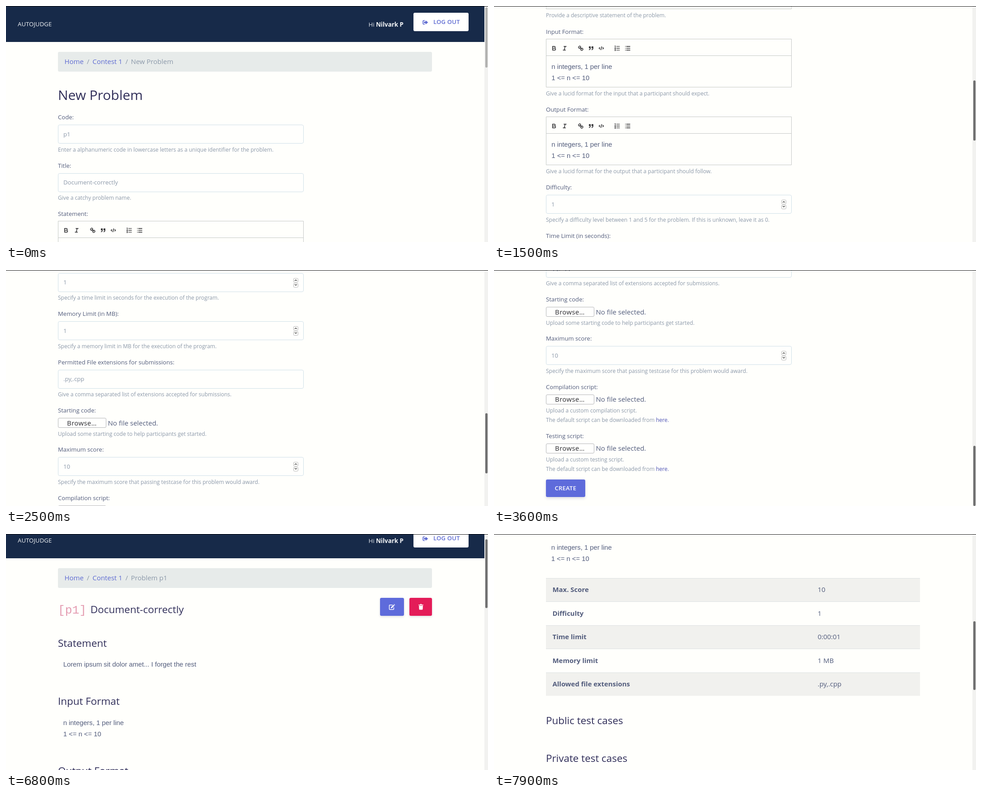
Write an HTML page with a canvas that moves like this. It is 1067 px wide and 525 px high and loops after 8 s.

```html
<!DOCTYPE html>
<html lang="en">
<head>
<meta charset="utf-8">
<title>New Problem</title>
<style>
  html, body { margin: 0; width: 100%; height: 100%; overflow: hidden; background: #fffffc; }
  canvas { display: block; width: 1067px; height: 525px; }
</style>
</head>
<body>
<canvas id="stage" width="1067" height="525"></canvas>
<script>
const W = 1067, H = 525, LOOP = 8000, STEP = 100;
const ctx = document.getElementById('stage').getContext('2d');

const OPEN = '"Open Sans", "Noto Sans", sans-serif';
const ARIAL = '"Liberation Sans", Arial, sans-serif';
const MONO = '"Liberation Mono", monospace';
const REM = 14.93, LABEL = 13.1, SMALL = 12, HEAD = 22.4, PROSE = 14.8;
const C = {
  page: '#fffffc', nav: '#172a49', crumb: '#e7ebea', head: '#302e59', body: '#525c7c',
  muted: '#8b98a9', link: '#5e6bd2', primary: '#5e6bdb', danger: '#e41c58',
  input: '#cfdfe8', line: '#c5c8c7', icon: '#3c3c3e', thumb: '#707070'
};

// Scroll offsets at [ms, px]
const formScroll = [[600, 0], [700, 90], [900, 318], [2000, 751], [2500, 1075], [2600, 1075], [2700, 1165], [2900, 1300], [3000, 1322]];
const viewScroll = [[6700, 0], [6800, 26], [7200, 194], [7900, 571]];

function track(keys, t) {
  if (t <= keys[0][0]) return keys[0][1];
  for (let i = 1; i < keys.length; i++) {
    const [t0, v0] = keys[i - 1], [t1, v1] = keys[i];
    if (t <= t1) return Math.round(v0 + (v1 - v0) * (t - t0) / (t1 - t0));
  }
  return keys[keys.length - 1][1];
}

// Text is placed by the middle of its capitals
function text(str, x, mid, size, color, { font = OPEN, weight = 400, align = 'left', spacing = 0 } = {}) {
  ctx.font = `${weight} ${size}px ${font}`;
  ctx.letterSpacing = spacing + 'px';
  ctx.textAlign = align;
  ctx.fillStyle = color;
  ctx.fillText(str, x, Math.round(mid + size * 0.36));
  ctx.letterSpacing = '0px';
}

function rect(x, y, w, h, color) {
  ctx.fillStyle = color;
  ctx.fillRect(x, y, w, h);
}

function box(x, y, w, h, r, fill, stroke) {
  ctx.beginPath();
  const inset = stroke ? 0.5 : 0;
  ctx.roundRect(x + inset, y + inset, w - 2 * inset, h - 2 * inset, r);
  if (fill) { ctx.fillStyle = fill; ctx.fill(); }
  if (stroke) { ctx.strokeStyle = stroke; ctx.lineWidth = 1; ctx.stroke(); }
}

function button(x, y, w, h, color, lift = 0) {
  ctx.save();
  ctx.shadowColor = `rgba(50,50,93,${0.16 + 0.04 * lift})`;
  ctx.shadowBlur = 5 + 4 * lift;
  ctx.shadowOffsetY = 2 + 2 * lift;
  box(x, y, w, h, 3.3, color);
  ctx.restore();
}

// Icons: stroked and filled outlines in a square of the given size
function icon({ size, line, fill, width = 2 }, cx, cy, scale, color) {
  ctx.save();
  ctx.translate(cx, cy);
  ctx.scale(scale, scale);
  ctx.translate(-size / 2, -size / 2);
  ctx.strokeStyle = ctx.fillStyle = color;
  ctx.lineWidth = width;
  ctx.lineCap = ctx.lineJoin = 'round';
  if (line) ctx.stroke(new Path2D(line));
  if (fill) ctx.fill(new Path2D(fill));
  ctx.restore();
}

const tools = [
  [133, { size: 18, line: 'M5 4H9.5A2.5 2.5 0 0 1 9.5 9H5ZM5 9H10.5A2.5 2.5 0 0 1 10.5 14H5Z' }],
  [156.5, { size: 18, line: 'M7 4H13M5 14H11M8 14L10 4' }],
  [192, { size: 18, line: 'M7 7L11 11M8.9 4.6A3.4 3.4 0 0 1 4.6 8.9C3.2 7.5 2 6.4 4.2 4.2S7.5 3.2 8.9 4.6ZM13.4 9.1A3.4 3.4 0 0 0 9.1 13.4C10.5 14.8 11.6 16 13.8 13.8S14.8 10.5 13.4 9.1Z' }],
  [215, { size: 18, line: 'M4 5H7V8H4ZM11 5H14V8H11ZM7 8C7 12 4 13 4 13M14 8C14 12 11 13 11 13', fill: 'M4 5H7V8H4ZM11 5H14V8H11Z' }],
  [237.5, { size: 18, line: 'M5 7L3 9 5 11M13 7L15 9 13 11M10 5L8 13' }],
  [273, { size: 18, width: 1.6, line: 'M7 4H15M7 9H15M7 14H15M2.5 3L3.5 2.5V5.5M2.5 7.8H4L2.5 10.2H4.2M2.5 12.5H4L3.2 14 4 15.5H2.5' }],
  [296, { size: 18, line: 'M6 4H15M6 9H15M6 14H15M3 4H3.05M3 9H3.05M3 14H3.05' }]
];
const signOut = { size: 16, line: 'M6 3H4Q2 3 2 5V11Q2 13 4 13H6', fill: 'M4.5 6H9V2.4L15.8 8 9 13.6V10H4.5Z' };
const pencil = {
  size: 16, width: 1.7, line: 'M9 3.5H2.5Q1.2 3.5 1.2 4.8V13.5Q1.2 14.8 2.5 14.8H11.2Q12.5 14.8 12.5 13.5V10',
  fill: 'M5.2 11.8L5.6 8.8 11.6 2.8 14 5.2 8 11.2ZM12.4 2L13.4 1 15.8 3.4 14.8 4.4Z'
};
const trash = { size: 16, fill: 'M1.5 2H5.5L6.2 .5H9.8L10.5 2H14.5V3.8H1.5ZM2.5 5H13.5L12.8 14.5Q12.7 16 11.3 16H4.7Q3.3 16 3.2 14.5Z' };

function header(current) {
  rect(0, 0, 1059, 80, C.nav);
  text('AUTOJUDGE', 26, 40, LABEL, '#f4f6f8', { weight: 500, spacing: 0.1 });
  text('Nilvark P', 880, 41, 13.4, '#f4f6f8', { weight: 700, align: 'right' });
  const nameWidth = ctx.measureText('Nilvark P').width;
  text('Hi', 880 - nameWidth - 3.5, 41, LABEL, '#e3e7ec', { align: 'right' });
  button(902, 15, 122, 41, '#ffffff');
  icon(signOut, 928, 36.5, 0.82, C.link);
  text('LOG OUT', 946, 35.5, LABEL, C.link, { weight: 600, spacing: 0.2 });

  box(115, 102, 828, 44, 3.3, C.crumb);
  text('Home', 129.5, 124, REM, C.link);
  text('/', 179, 124, REM, C.muted);
  text('Contest 1', 191.5, 124, REM, C.link);
  text('/', 264.5, 124, REM, C.muted);
  text(current, 276.5, 124, REM, C.muted);
}

const label = (str, y) => text(str, 115, y + 0.3, LABEL, C.body);
const help = (str, y) => text(str, 115, y + 0.3, SMALL, C.muted);

function spinner(y) {
  [0, 11].forEach(d => box(636, y - 10 + d, 11, 10, 2, '#fdfdfb', '#b9b9b9'));
  ctx.strokeStyle = '#333';
  ctx.lineWidth = 1.2;
  ctx.lineCap = 'butt';
  [[-5, -1], [5, 1]].forEach(([d, s]) => {
    ctx.beginPath();
    ctx.moveTo(639, y + d - s);
    ctx.lineTo(641.5, y + d + s);
    ctx.lineTo(644, y + d - s);
    ctx.stroke();
  });
}

function field(name, value, hint, y, numeric) {
  label(name, y);
  box(115, Math.round(y + 17), 544, 42, 3.3, '#fffffd', C.input);
  text(value, 127, y + 38, LABEL, C.muted);
  if (numeric) spinner(Math.round(y + 38));
  help(hint, y + 72);
}

function editor(name, lines, hint, y) {
  const top = Math.round(y + 16), height = 58 + 25 * lines.length;
  label(name, y);
  box(115, top, 544, height, 0, null, C.line);
  rect(115, top + 37, 544, 1, C.line);
  tools.forEach(([x, shape]) => icon(shape, x, top + 21, 0.83, C.icon));
  lines.forEach((s, i) => text(s, 127.3, top + 61.5 + 25 * i, PROSE, C.body, { font: ARIAL }));
  help(hint, top + height + 13.5);
}

function squiggle(x0, x1, y) {
  ctx.beginPath();
  for (let x = x0; x <= x1; x += 2) ctx.lineTo(x, y + ((x - x0) % 4 ? 1 : -1));
  ctx.strokeStyle = '#b8284f';
  ctx.lineWidth = 1;
  ctx.stroke();
}

function upload(name, hint, y, withDefault) {
  label(name, y);
  box(115, Math.floor(y + 17.5), 107, 22, 2.5, '#fffffd', '#b4b5b8');
  text('Browse…', 168, y + 28.5, REM, '#2b2b30', { align: 'center', spacing: 0.4 });
  text('No file selected.', 225.5, y + 28.5, 15, C.body);
  help(hint, y + 52.5);
  if (withDefault) {
    const lead = 'The default script can be downloaded from ';
    help(lead, y + 74);
    text('here.', 115 + ctx.measureText(lead).width, y + 74.3, SMALL, '#4f54b4');
  }
}

const sample = ['n integers, 1 per line', '1 <= n <= 10'];
const lorem = 'Lorem ipsum sit dolor amet... I forget the rest';

function formPage(lift) {
  header('New Problem');
  text('New Problem', 115, 198.5, 29.9, C.head);
  field('Code:', 'p1', 'Enter a alphanumeric code in lowercase letters as a unique identifier for the problem.', 247);
  field('Title:', 'Document-correctly', 'Give a catchy problem name.', 354.5);
  editor('Statement:', [lorem], 'Provide a descriptive statement of the problem.', 462);
  [[128, 170], [174, 213], [273, 306]].forEach(([a, b]) => squiggle(a, b, 547));
  editor('Input Format:', sample, 'Give a lucid format for the input that a participant should expect.', 610.5);
  editor('Output Format:', sample, 'Give a lucid format for the output that a participant should follow.', 783.5);
  field('Difficulty:', '1', 'Specify a difficulty level between 1 and 5 for the problem. If this is unknown, leave it as 0.', 957, true);
  field('Time Limit (in seconds):', '1', 'Specify a time limit in seconds for the execution of the program.', 1064.5, true);
  field('Memory Limit (in MB):', '1', 'Specify a memory limit in MB for the execution of the program.', 1172, true);
  field('Permitted File extensions for submissions:', '.py,.cpp', 'Give a comma separated list of extensions accepted for submissions.', 1279.5);
  upload('Starting code:', 'Upload some starting code to help participants get started.', 1387);
  field('Maximum score:', '10', 'Specify the maximum score that passing testcase for this problem would award.', 1474, true);
  upload('Compilation script:', 'Upload a custom compilation script.', 1581.5, true);
  upload('Testing script:', 'Upload a custom testing script.', 1690.5, true);
  button(115, 1788, 87, 39, C.primary, lift);
  text('CREATE', 134.5, 1807.5, LABEL, '#fff', { weight: 600, spacing: 0.2 });
}

function section(title, y, lines = []) {
  text(title, 115, y, HEAD, C.head);
  lines.forEach((s, i) => text(s, 126.7, y + 47.3 + 25 * i, PROSE, C.body, { font: ARIAL }));
}

function viewPage() {
  header('Problem p1');
  text('[p1]', 115, 194, 26.2, '#e49bb0', { font: MONO });
  text('Document-correctly', 187, 194, HEAD, C.head);
  button(828, 168, 53, 40, C.primary);
  icon(pencil, 854.5, 188, 0.88, '#fff');
  button(893, 168, 50, 40, C.danger);
  icon(trash, 918.5, 188, 0.82, '#fff');

  section('Statement', 268.5, [lorem]);
  section('Input Format', 398, sample);
  section('Output Format', 553, sample);

  const rows = [['Max. Score', '10'], ['Difficulty', '1'], ['Time limit', '0:00:01'], ['Memory limit', '1 MB'], ['Allowed file extensions', '.py,.cpp']];
  rows.forEach(([name, value], i) => {
    const y = 668.5 + 52.5 * i, top = Math.round(y);
    if (i % 2 === 0) rect(115, top, 828, 52, '#f1f1ee');
    rect(115, top, 828, 1, '#dde1e2');
    text(name, 129.5, y + 26.5, REM, C.body, { weight: 700 });
    text(value, 716.5, y + 26.5, REM, C.body);
  });
  section('Public test cases', 985.5);
  section('Private test cases', 1070);
}

function scrollbar(top, height, color) {
  rect(1059, 0, 8, H, '#f2f2f0');
  box(1061, top, 5, height, 2.5, color);
}

function status(t) {
  if (t < 4300 || t >= 5100) return;
  const message = t < 4600 ? 'Waiting for localhost…' : t < 4800 ? 'Read localhost' : 'Transferring data…';
  ctx.globalAlpha = t < 4400 ? 0.5 : 1;
  rect(0, 500, 264, 25, '#f2f2f0');
  rect(0, 500, 264, 1, '#cfcfcd');
  rect(263, 500, 1, 25, '#cfcfcd');
  text(message, 4, 518, LABEL, '#3a3a3c');
  ctx.globalAlpha = 1;
}

function draw(t) {
  const onForm = t < 5000;
  const y = track(onForm ? formScroll : viewScroll, t);
  rect(0, 0, W, H, C.page);
  ctx.save();
  ctx.translate(0, -y);
  if (onForm) formPage(Math.max(0, Math.min(1, (t - 3500) / 300)));
  else viewPage();
  ctx.restore();
  if (onForm) scrollbar(3 + y * 0.2935, 134, t < 400 ? '#b2b2b0' : C.thumb);
  else scrollbar(3 + y * 0.3345, 153, C.thumb);
  status(t);
  rect(0, 0, W, 1, '#0b0b0d');
}

function tick(now) {
  draw(Math.floor((now % LOOP) / STEP) * STEP);
  requestAnimationFrame(tick);
}
draw(0);
requestAnimationFrame(tick);
</script>
</body>
</html>
```
